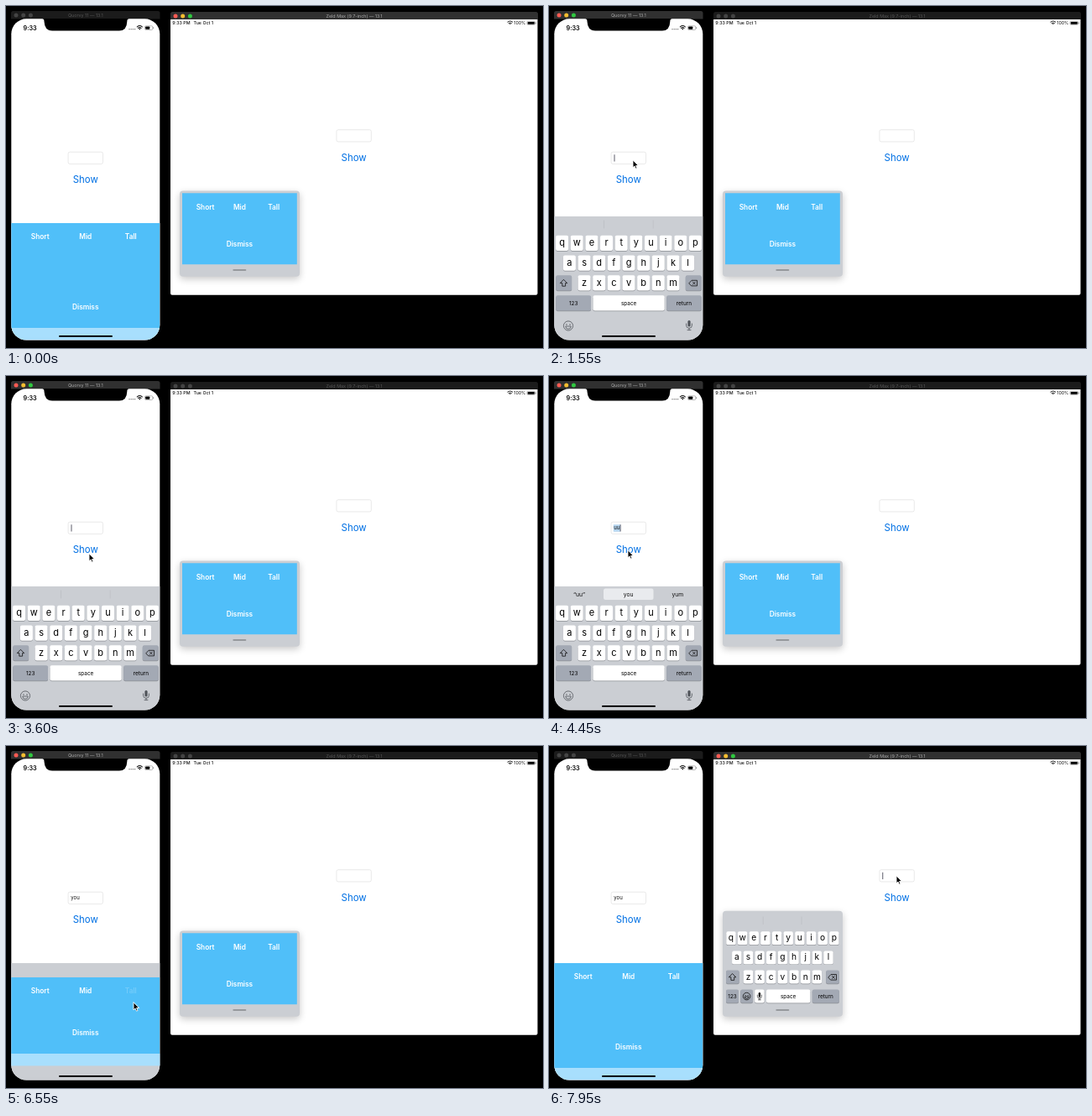
Write an HTML page with a canvas that moves like this. It is 640 px wide and 408 px high and loops after 8 s.

```html
<!DOCTYPE html>
<html lang="en">
<head>
<meta charset="utf-8">
<style>
  html, body { margin: 0; width: 100%; height: 100%; overflow: hidden; background: #000; }
  canvas { display: block; width: 640px; height: 408px; }
</style>
</head>
<body>
<canvas></canvas>
<script>
const LOOP = 8000;
const BLUE = '#50bff9', TINT = '#a8dffd', TRAY = '#cbced3', DARK_KEY = '#a3a9b4', LINK = '#0070e4';
const PHONE_FOCUS = 1300, TYPE_ONE = 3700, TYPE_TWO = 3950, SHOW = 4550;
const MID = 5900, TALL = 6550, GROW = 250, TABLET_FOCUS = 7700;
const ROWS = ['qwertyuiop', 'asdfghjkl', 'zxcvbnm'];
// time, x, y of the pointer tip
const POINTER = [
  [650, 100, 412], [1200, 100, 184], [2000, 100, 184], [2500, 99, 212], [4000, 99, 212], [4350, 94, 208],
  [4750, 94, 208], [5500, 88, 281], [5950, 88, 281], [6400, 152, 306], [6900, 152, 306], [7550, 414, 155]
];

const canvas = document.querySelector('canvas');
const ctx = canvas.getContext('2d');
const density = window.devicePixelRatio || 1;
canvas.width = 640 * density;
canvas.height = 408 * density;

const clamp = v => Math.max(0, Math.min(1, v));
const ease = v => { v = clamp(v); return v * v * (3 - 2 * v); };
const mix = (a, b, k) => a + (b - a) * k;
const between = (t, a, b) => t >= a && t < b;

function box(x, y, w, h, fill, r = 0, stroke, lineWidth = 0.8) {
  ctx.beginPath();
  ctx.roundRect(x, y, w, h, r);
  if (fill) { ctx.fillStyle = fill; ctx.fill(); }
  if (stroke) { ctx.strokeStyle = stroke; ctx.lineWidth = lineWidth; ctx.stroke(); }
}

function disc(x, y, r, fill) {
  box(x - r, y - r, 2 * r, 2 * r, fill, r);
}

function label(str, x, y, size, fill, weight = 400, align = 'center') {
  ctx.font = `${weight} ${size}px Inter, sans-serif`;
  ctx.textAlign = align;
  ctx.fillStyle = fill;
  ctx.fillText(str, x, y + size * 0.35);
}

function lines(d, x, y, color, width = 0.8, fill) {
  const path = new Path2D(d);
  ctx.save();
  ctx.translate(x, y);
  if (fill) { ctx.fillStyle = fill; ctx.fill(path); }
  ctx.strokeStyle = color;
  ctx.lineWidth = width;
  ctx.lineCap = ctx.lineJoin = 'round';
  ctx.stroke(path);
  ctx.restore();
}

function titleBar(x, y, w, h, title, active) {
  box(x, y, w, h, active ? '#303030' : '#1b1b1b', [2.5, 2.5, 0, 0]);
  const lights = active ? ['#fc5b53', '#f6bd2f', '#2fc83f'] : ['#444', '#444', '#444'];
  lights.forEach((c, i) => disc(x + 6 + i * 8.7, y + h / 2 + 0.3, 2.5, c));
  label(title, x + w / 2, y + h / 2 + 0.3, 5.4, active ? '#aaa' : '#555');
}

function wifi(x, y, s) {
  lines('M-3 -1Q0 -3.6 3 -1M-1.7 .6Q0 -.9 1.7 .6', x, y, '#111', 1.1 * s);
  disc(x, y + 1.8 * s, 0.8 * s, '#111');
}

function battery(x, y, w, h, level) {
  box(x, y, w, h, null, 1.2, '#777', 0.5);
  box(x + 0.7, y + 0.7, (w - 1.4) * level, h - 1.4, '#000', 0.7);
  box(x + w + 0.6, y + h / 2 - 0.8, 0.7, 1.6, '#777');
}

function form(cx, fieldY, { text = '', caret, marked, pressed }) {
  box(cx - 20.7, fieldY, 41.4, 14.2, '#fff', 2, '#e0e0e0', 0.7);
  ctx.font = '400 6px Inter, sans-serif';
  const left = cx - 17.5, width = ctx.measureText(text).width;
  if (marked) box(left - 0.5, fieldY + 3, width + 1, 8.6, '#b5d5ef');
  label(text, left, fieldY + 7, 6, '#111', 400, 'left');
  if (caret) box(left + width + 0.3, fieldY + 3, 0.8, 8.3, '#334');
  ctx.globalAlpha = pressed ? 0.2 : 1;
  label('Show', cx, fieldY + 33, 11.4, LINK);
  ctx.globalAlpha = 1;
}

function panel(x, w, top, bottom, step, labelY, dismissY, pressed) {
  box(x, top, w, bottom - top, BLUE);
  ['Short', 'Mid', 'Tall'].forEach((name, i) => {
    label(name, x + w / 2 + (i - 1) * step, labelY, 8.3,
      name === pressed ? 'rgba(255,255,255,.2)' : '#fff', 600);
  });
  label('Dismiss', x + w / 2, dismissY, 8.3, '#fff', 600);
}

function key(x, y, w, h, fill = '#fff') {
  box(x, y + 0.7, w, h, '#8b8e94', 2);
  box(x, y, w, h, fill, 2);
}

function letterKeys(cx, top, pitch, rowStep, w, h, size) {
  ROWS.forEach((row, r) => [...row].forEach((ch, i) => {
    const x = cx + (i - (row.length - 1) / 2) * pitch, y = top + r * rowStep;
    key(x - w / 2, y, w, h);
    label(ch, x, y + h / 2 - 0.6, size, '#000');
  }));
}

function wordKey(str, x, y, w, h, fill, size = 6.4) {
  key(x, y, w, h, fill);
  label(str, x + w / 2, y + h / 2, size, '#000');
}

const shiftIcon = (x, y) => lines('M0 -4L4 0H1.9V3.6H-1.9V0H-4Z', x, y, '#111');
const deleteIcon = (x, y) =>
  lines('M-5 0L-2 -3.3H4.5V3.3H-2ZM-.6 -1.5L2.4 1.5M2.4 -1.5L-.6 1.5', x, y, '#111');

function smiley(x, y, r, color) {
  box(x - r, y - r, 2 * r, 2 * r, null, r, color, 0.8);
  disc(x - r * 0.36, y - r * 0.25, r * 0.13, color);
  disc(x + r * 0.36, y - r * 0.25, r * 0.13, color);
  ctx.beginPath();
  ctx.arc(x, y + r * 0.1, r * 0.58, 0, Math.PI);
  ctx.closePath();
  ctx.stroke();
}

function mic(x, y, s, color) {
  box(x - 1.6 * s, y - 6 * s, 3.2 * s, 7.5 * s, color, 1.6 * s);
  ctx.save();
  ctx.translate(x, y);
  ctx.scale(s, s);
  lines('M-3.4 -2V0A3.4 3.4 0 0 0 3.4 0V-2M0 3.4V5.6M-2 5.6H2', 0, 0, color, 0.8);
  ctx.restore();
}

function phoneKeyboard(words) {
  box(6, 251, 178, 148, TRAY);
  if (words) {
    box(65, 253.5, 59.5, 13.5, '#e9ebee', 2.5);
    words.forEach((word, i) => label(word, 36 + i * 58.7, 260.5, 6.8, '#111'));
  } else {
    for (const x of [65.3, 123.8]) box(x, 255.5, 0.6, 10, '#b8bbc0');
  }
  letterKeys(95, 273.7, 17.65, 23.8, 15, 18.3, 11);
  key(8.3, 321.3, 18.8, 18.3, DARK_KEY);
  key(162.8, 321.3, 18.8, 18.3, DARK_KEY);
  shiftIcon(17.7, 330.6);
  deleteIcon(172, 330.6);
  wordKey('123', 8.3, 345.2, 41.7, 18.3, DARK_KEY);
  wordKey('space', 52.5, 345.2, 85.2, 18.3);
  wordKey('return', 140.2, 345.2, 41.4, 18.3, DARK_KEY);
  smiley(23, 381.5, 5.6, '#50545a');
  mic(167, 381, 1, '#50545a');
}

function phonePanel(t) {
  let tray = 259, top = 259, end = 398.5;
  if (between(t, MID, TALL)) {
    tray = top = mix(259, 293, ease((t - MID) / GROW));
  } else if (t >= TALL) {
    const inset = 17 * (1 - ease((t - TALL) / GROW));
    top += inset;
    end -= inset;
  }
  const bottom = end - 14.5;
  const pressed = between(t, MID - 100, MID + 50) ? 'Mid' : between(t, TALL - 80, TALL + 100) ? 'Tall' : '';
  box(6, tray, 178, 399 - tray, TRAY);
  box(6, bottom, 178, end - bottom, TINT);
  panel(6, 177.5, top, bottom, 54, top + 16.5, bottom - 24.7, pressed);
}

function phone(t) {
  const active = between(t, PHONE_FOCUS, TABLET_FOCUS);
  const typing = between(t, PHONE_FOCUS + 50, SHOW);
  const blink = (t - PHONE_FOCUS - 50) % 1000 < 600 || between(t, TYPE_ONE, SHOW);
  const text = t >= SHOW ? 'you' : t >= TYPE_TWO ? 'uu' : t >= TYPE_ONE ? 'u' : '';
  const words = t >= TYPE_TWO ? ['“uu”', 'you', 'yum'] : t >= TYPE_ONE ? ['“u”', 'you', 'up'] : null;

  titleBar(6, 6, 177.5, 9.5, 'Quorvy 11 — 13.1', active);
  ctx.save();
  box(6.3, 15.3, 177, 383.2, '#fff', 18);
  ctx.clip();
  form(94.8, 174.2, {
    text, caret: typing && blink, marked: typing && text === 'uu',
    pressed: between(t, SHOW - 70, SHOW + 50)
  });
  if (typing) phoneKeyboard(words); else phonePanel(t);
  box(63, 393, 64, 2, '#000', 1);
  ctx.restore();

  ctx.fillStyle = '#000';
  ctx.fill(new Path2D('M43 15Q45.5 15.3 45.5 18.5Q46 29.5 55 29.5H135Q144 29.5 144.3 18.5Q144.3 15.3 147 15Z'));
  label('9:33', 28.6, 26.2, 7.2, '#000', 600);
  for (let i = 0; i < 4; i++) disc(147 + i * 2.2, 27.7, 0.6, '#555');
  wifi(159.3, 25.8, 1);
  battery(165.5, 23.8, 9.3, 4.7, 0.65);
}

function floatingKeyboard() {
  for (const x of [254.8, 300.7]) box(x, 203.5, 0.6, 9.5, '#b8bbc0');
  letterKeys(278.4, 221.2, 13.65, 23.2, 11.4, 16, 10.2);
  key(211, 267.6, 15.6, 16, DARK_KEY);
  key(330.2, 267.6, 15.6, 16, DARK_KEY);
  shiftIcon(218.8, 275.8);
  deleteIcon(338, 275.8);
  wordKey('123', 211, 290.6, 15, 16, DARK_KEY);
  key(228.3, 290.6, 14.6, 16, DARK_KEY);
  smiley(235.6, 298.6, 4.3, '#111');
  key(245.2, 290.6, 11.4, 16);
  mic(250.9, 298.6, 0.75, '#111');
  wordKey('space', 259, 290.6, 52.3, 16);
  wordKey('return', 313.8, 290.6, 32, 16, DARK_KEY);
}

function tablet(t) {
  const active = !between(t, PHONE_FOCUS, TABLET_FOCUS);
  const typing = t >= TABLET_FOCUS + 50;
  titleBar(196, 7, 438, 9.2, 'Zeld Max (9.7-inch) — 13.1', active);
  box(196, 16, 437.5, 328.8, '#fff', [0, 0, 2, 2]);
  label('9:33 PM', 198.3, 20.4, 5.3, '#111', 500, 'left');
  label('Tue Oct 1', 223.6, 20.4, 5.3, '#111', 500, 'left');
  wifi(600.8, 20, 0.8);
  label('100%', 619.3, 20.4, 5.3, '#111', 400, 'right');
  battery(621, 18.4, 9.6, 4, 1);
  form(414.6, 147.7, { caret: typing });

  const top = typing ? 196.8 : 220.6;
  ctx.save();
  ctx.shadowColor = 'rgba(0,0,0,.22)';
  ctx.shadowBlur = 9 * density;
  ctx.shadowOffsetY = 3 * density;
  box(207, top, 143, 322.8 - top, TRAY, 4);
  ctx.restore();
  if (typing) floatingKeyboard();
  else panel(210, 136.8, 223.3, 308.3, 40.8, 240, 284);
  box(270.3, 314, 16, 2, '#96999d', 1);
}

function pointer(t) {
  if (t < POINTER[0][0]) return;
  let i = 0;
  while (i < POINTER.length - 2 && t >= POINTER[i + 1][0]) i++;
  const [t0, x0, y0] = POINTER[i], [t1, x1, y1] = POINTER[i + 1];
  const k = ease((t - t0) / (t1 - t0));
  lines('M0 0V8.8L2 7L3.5 10.2L5 9.5L3.6 6.5H6.3Z', mix(x0, x1, k), mix(y0, y1, k), '#fff', 0.9, '#000');
}

function draw(now) {
  const t = now % LOOP;
  ctx.setTransform(density, 0, 0, density, 0, 0);
  ctx.fillStyle = '#000';
  ctx.fillRect(0, 0, 640, 408);
  tablet(t);
  phone(t);
  pointer(t);
}

const start = performance.now();
function tick() {
  draw(performance.now() - start);
  requestAnimationFrame(tick);
}
tick();
</script>
</body>
</html>
```
